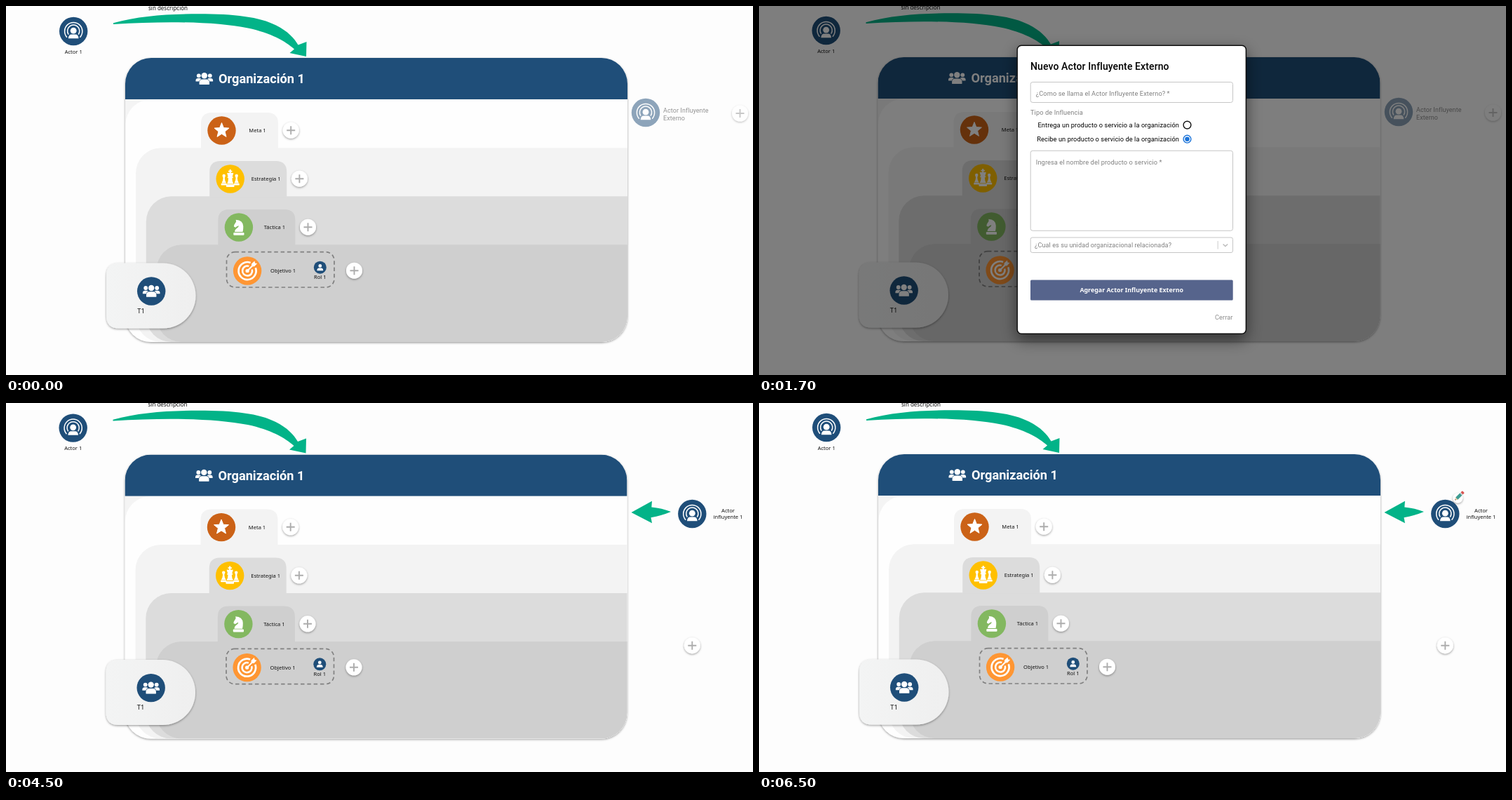
Animation of 1065 by 526 pixels, one loop 8000 ms. Source, as an HTML page:

```html
<!DOCTYPE html>
<html lang="es">
<head>
<meta charset="utf-8">
<style>
  html, body { margin: 0; width: 100%; height: 100%; overflow: hidden; background: #fdfdfd; }
  svg { display: block; width: 1065px; height: 526px; }
  text { font-family: Roboto, sans-serif; font-size: 9.25px; letter-spacing: .0094em; }
  .label { font-family: "Noto Sans", "Open Sans", sans-serif; font-size: 7.55px; letter-spacing: 0; fill: #111; }
  .mid { text-anchor: middle; }
  .end { text-anchor: end; }
  .hint { fill: #808080; }
  .small { font-size: 6.94px; fill: #707070; }
  .field { fill: #fff; stroke: #c6c6c6; }
</style>
</head>
<body>
<svg id="stage" viewBox="0 0 1065 526">
  <defs>
    <filter id="soft" x="-20%" y="-20%" width="140%" height="150%">
      <feDropShadow dx="0" dy="1.2" stdDeviation="1.6" flood-opacity=".4"/>
    </filter>
    <filter id="deep" x="-20%" y="-20%" width="140%" height="150%">
      <feDropShadow dx="0" dy="8" stdDeviation="11" flood-opacity=".5"/>
    </filter>
    <clipPath id="card"><rect x="170" y="74" width="716" height="405" rx="37"/></clipPath>
    <linearGradient id="tab" x2="1"><stop stop-color="#f3f4f4"/><stop offset="1" stop-color="#efefef"/></linearGradient>

    <g id="actor">
      <circle r="20.2" fill="#1f4e79"/>
      <g fill="none" stroke="#fff" stroke-width="1.5" stroke-linecap="round">
        <path d="M-9.6 8.2A12.6 12.6 0 1 1 9.6 8.2"/>
        <path d="M-7.3 4.2A8.6 8.6 0 1 1 7.3 4.2"/>
      </g>
      <circle cy="-.8" r="4.4" fill="#fff"/>
      <path d="M-7.3 10.2Q-7 4.6-2.8 4.6H2.8Q7 4.6 7.3 10.2Z" fill="#fff"/>
    </g>
    <g id="people" fill="#fff">
      <circle cx="-8" cy="-4" r="2.9"/><circle cx="8" cy="-4" r="2.9"/>
      <path d="M-12.3 4.2V2.5Q-12-.3-9-.3H-6.6Q-5.3-.3-4.5.6Q-7 2-7.5 4.2Z"/>
      <path d="M12.3 4.2V2.5Q12-.3 9-.3H6.6Q5.3-.3 4.5.6Q7 2 7.5 4.2Z"/>
      <circle cy="-4" r="4.2"/>
      <path d="M-7.2 8.3V5.8Q-7 1.3-2.8 1.3H2.8Q7 1.3 7.2 5.8V8.3Q7.2 8.8 6.4 8.8H-6.4Q-7.2 8.8-7.2 8.3Z"/>
    </g>
    <g id="add">
      <circle r="11.5" fill="#fff" filter="url(#soft)"/>
      <path d="M-6 0H6M0-6V6" stroke="#adadad" stroke-width="1.9"/>
    </g>
    <path id="star" fill="#fff" stroke="#fff" stroke-linejoin="round"/>
    <g id="pawn"><circle cy="-4.5" r="2.2"/><path d="M-1.6-3H1.6L1.1-1Q1.3 3 3.3 6H-3.3Q-1.3 3-1.1-1Z"/><rect x="-4" y="6.4" width="8" height="2.7" rx=".6"/></g>
    <g id="chess" fill="#fff">
      <use href="#pawn" x="-9"/><use href="#pawn" x="9"/>
      <path d="M-1-13.5H1V-11.8H2.7V-10H1V-8.4H4.6L3-3H4V-1.3H2.6Q2.8 4 4.6 7H-4.6Q-2.8 4-2.6-1.3H-4V-3H-3L-4.6-8.4H-1V-10H-2.7V-11.8H-1Z"/>
      <rect x="-5.8" y="7.8" width="11.6" height="3.8" rx=".8"/>
    </g>
    <g id="knight" fill="#fff">
      <path d="M-5.8 6.6Q-5.8 3.2-2.4 1Q0-.6-.2-2.6L-3.2-.9L-4.6.2L-7-1L-6.6-3.4L-3.8-8L-4.2-10.8Q5.8-10.6 6.4-1.5Q6.5 3 5.6 6.6Z"/>
      <rect x="-7.6" y="7.5" width="15.2" height="3.8" rx="1"/>
    </g>
    <g id="goal" fill="none" stroke="#fff">
      <path d="M4.5-11.6A12.5 12.5 0 1 0 11.7-4.3" stroke-width="2.7"/>
      <path d="M2.2-6.6A7 7 0 1 0 6.7-2" stroke-width="2.5"/>
      <circle r="2.6" fill="#fff" stroke="none"/>
      <path d="M0 0L9-9" stroke-width="2"/>
      <path d="M6-6.2V-10L10.3-14L11-11L14-10.4L10-6.2Z" fill="#fff" stroke="none"/>
    </g>
  </defs>

  <rect width="1065" height="526" fill="#fdfdfd"/>

  <g id="board">
    <use href="#actor" x="96.2" y="36"/>
    <text class="label mid" x="96.2" y="67.6">Actor 1</text>
    <text class="label" x="203" y="5.6" style="font-size:8px">sin descripción</text>
    <path fill="#02b388" d="M153 24.2C190 14 230 11.2 275 11.2C325 11.2 362 15.5 385 27.5C402 36 411 46 416.5 55.5L428.5 51L428 72L404.5 67L411 61.5C398 50 378 38.5 345 31.5C300 22.5 230 21 153 26Z"/>

    <rect x="170" y="74" width="716" height="405" rx="37" fill="#f4f4f4" filter="url(#soft)"/>
    <g clip-path="url(#card)">
      <g id="levels"></g>
      <rect x="170" y="74" width="716" height="59" fill="#1f4e79"/>
    </g>
    <use href="#people" x="282.8" y="103.3"/>
    <text x="303" y="110" fill="#fff" style="font-size:18.2px;font-weight:700;letter-spacing:0">Organización 1</text>
    <g id="rows"></g>
    <rect x="314.5" y="350.7" width="153.5" height="50.3" rx="12" fill="none" stroke="#818181" stroke-width="1.7" stroke-dasharray="5.5 3.8"/>
    <circle cx="447.8" cy="372.7" r="9" fill="#1f4e79"/>
    <circle cx="447.8" cy="370.4" r="2.4" fill="#fff"/>
    <path d="M443.4 377.2Q443.6 373.5 446 373.5H449.6Q452 373.5 452.2 377.2Z" fill="#fff"/>
    <text class="label mid" x="447.8" y="389.2">Rol 1</text>

    <path d="M161 366.5H224A46.5 46.5 0 0 1 224 459.5H161Q143 459.5 143 441.5V384.5Q143 366.5 161 366.5Z" fill="url(#tab)" filter="url(#soft)"/>
    <circle cx="207.2" cy="406.5" r="20.2" fill="#1f4e79"/>
    <use href="#people" x="207.2" y="406"/>
    <text class="label" x="187.3" y="437.6" style="font-size:9.3px">T1</text>
  </g>

  <g id="draft">
    <use href="#actor" x="912" y="152" opacity=".5"/>
    <text x="937" y="152.4" fill="#929292" style="font-size:9px">Actor Influyente</text>
    <text x="937" y="163.2" fill="#929292" style="font-size:9px">Externo</text>
    <use href="#add" x="1046.5" y="153" opacity=".65"/>
  </g>

  <g id="added">
    <path fill="#02b388" d="M891.5 156L921 139.7L920.3 148.6Q935 150 948 155Q935 160.5 919.5 163.2L921 171.2Z"/>
    <use href="#actor" x="978.3" y="158"/>
    <text class="label mid" x="1029.5" y="156.4">Actor</text>
    <text class="label mid" x="1029.5" y="165.3">influyente 1</text>
    <use href="#add" x="978.3" y="345.7"/>
  </g>

  <g id="pencil">
    <circle cx="996.3" cy="135.5" r="7" fill="#fff" filter="url(#soft)"/>
    <g transform="translate(998.3 132.6) rotate(-45)">
      <path d="M-8.5 0L-5-2.2V2.2Z" fill="#e8c9a0"/>
      <path d="M-8.5 0L-7.1-.9V.9Z" fill="#444"/>
      <rect x="-5" y="-2.2" width="8.5" height="4.4" fill="#3f9c91"/>
      <rect x="3.5" y="-2.2" width="1.7" height="4.4" fill="#c5ccd0"/>
      <rect x="5.2" y="-2.2" width="3.3" height="4.4" rx="1" fill="#d9534f"/>
    </g>
  </g>

  <g id="dialog">
    <rect width="1065" height="526" fill="#000" opacity=".5"/>
    <g id="form">
      <rect x="368.2" y="56.2" width="326.2" height="411" rx="6" fill="#fff" stroke="#111" stroke-width="1.5" filter="url(#deep)"/>
      <text x="387" y="91" style="font-size:14px;font-weight:500;letter-spacing:.0075em">Nuevo Actor Influyente Externo</text>
      <rect id="name" class="field" x="387.2" y="108.5" width="288.3" height="29" rx="3"/>
      <text class="hint" x="387" y="154.6">Tipo de Influencia</text>
      <text class="end" x="599" y="172.9">Entrega un producto o servicio a la organización</text>
      <text class="end" x="599" y="193.1">Recibe un producto o servicio de la organización</text>
      <g id="gives"></g>
      <g id="takes"></g>
      <rect class="field" x="387.2" y="206.3" width="288.3" height="114" rx="3"/>
      <rect class="field" x="387.2" y="330" width="288.3" height="21.5" rx="2.5"/>
      <path d="M654.2 335V346.5" stroke="#ccc"/>
      <path d="M661.6 339.4L664.9 342.6L668.2 339.4" fill="none" stroke="#bbb" stroke-width="1.4"/>
      <g id="empty" class="hint">
        <text x="394.8" y="128">¿Como se llama el Actor Influyente Externo? *</text>
        <text x="394.8" y="225.7">Ingresa el nombre del producto o servicio *</text>
        <text x="393" y="343.8" style="font-size:9.1px">¿Cual es su unidad organizacional relacionada?</text>
      </g>
      <g id="filled" fill="#222">
        <path d="M392.5 108.5H542M392.5 206.3H534" stroke="#fff" stroke-width="2.4"/>
        <text class="small" x="395.3" y="110.9">¿Como se llama el Actor Influyente Externo? *</text>
        <text class="small" x="395.3" y="208.6">Ingresa el nombre del producto o servicio *</text>
        <text x="396.3" y="126.2">Actor influyente 1</text>
        <text x="396.3" y="227.5">Sin desc</text>
        <path id="squiggle" fill="none" stroke="#e03030" stroke-width=".9"/>
        <text x="393.3" y="343.6">Táctica 1</text>
        <path d="M640.7 338L645.7 343M645.7 338L640.7 343" stroke="#b5b5b5" stroke-width="1.3"/>
      </g>
      <rect x="387" y="390.4" width="288.7" height="29" rx="1.5" fill="#56648c"/>
      <text class="label mid" x="531.2" y="408.4" style="font-size:8.87px;font-weight:700;fill:#fff">Agregar Actor Influyente Externo</text>
      <text class="end" x="675.6" y="446.6" fill="#8c8c8c">Cerrar</text>
    </g>
  </g>
</svg>

<script>
const $ = id => document.getElementById(id);

const points = Array.from({ length: 10 }, (_, i) => {
  const r = i % 2 ? 4.8 : 11, a = i * Math.PI / 5;
  return `${r * Math.sin(a)} ${-r * Math.cos(a)}`;
});
$('star').setAttribute('d', `M${points.join('L')}Z`);
$('squiggle').setAttribute('d', 'M412 228.8' + 'q1 -1.8 2 0t2 0'.repeat(5));

const shades = ['#fefefe', '#f3f3f3', '#dcdcdc', '#cfcfcf'];
$('levels').innerHTML = shades.map((fill, i) =>
  `<rect x="${170.4 + i * 14.7}" y="${133.3 + i * 69}" width="800" height="${345.7 - i * 69}" rx="36" fill="${fill}"/>`).join('');

const rows = [
  ['Meta 1', '#cb6217', 'star', 406.2],
  ['Estrategia 1', '#ffc000', 'chess', 418.4],
  ['Táctica 1', '#83b860', 'knight', 430.5],
  ['Objetivo 1', '#ff9633', 'goal', 496.5],
];
$('rows').innerHTML = rows.map(([name, color, icon, addX], i) => {
  const x = 307.5 + i * 12.2, y = i < 3 ? 177.5 + i * 69 : 377.5;
  const tab = i < 3
    ? `<path d="M${x - 29.5} ${y + 26}v-36q0-15.5 15.5-15.5h79q15.5 0 15.5 15.5v36z" fill="${shades[i + 1]}"/>` : '';
  return `${tab}<circle cx="${x}" cy="${y}" r="20.2" fill="${color}"/>
    <use href="#${icon}" x="${x}" y="${y}"/>
    <text class="label mid" x="${x + 51}" y="${y + 2.8}">${name}</text>
    <use href="#add" x="${addX}" y="${y - .3}"/>`;
}).join('');

function radio(id, y, on) {
  $(id).innerHTML = `<circle cx="610.5" cy="${y}" r="5.4" fill="#fff" stroke="${on ? '#1a73d9' : '#111'}" stroke-width="1.4"/>`
    + (on ? `<circle cx="610.5" cy="${y}" r="3.3" fill="#1a73d9"/>` : '');
}

const show = (id, on) => $(id).style.display = on ? '' : 'none';
const move = (id, x, y) => $(id).setAttribute('transform', `translate(${x} ${y})`);

const LOOP = 8000;
const scenes = [
  { until: 500, x: 0, y: 0 },
  { until: 2500, x: -.5, y: -1, dialog: true },
  { until: 4500, x: .5, y: 7.6, dialog: true, filled: true },
  { until: 6500, x: -.5, y: -.4, added: true },
  { until: LOOP, x: 0, y: -1, added: true, pencil: true },
];
let current;

function render(time) {
  const scene = scenes.find(s => time % LOOP < s.until);
  if (scene === current) return;
  current = scene;
  const { x, y, dialog, filled, added, pencil } = scene;
  move('board', x, y);
  move('draft', 0, y);
  move('form', filled ? .7 : 0, filled ? 8.6 : 0);
  show('draft', !added);
  show('added', added);
  show('pencil', pencil);
  show('dialog', dialog);
  show('empty', !filled);
  show('filled', filled);
  $('name').style.stroke = filled ? '#444' : '';
  radio('gives', 169.6, filled);
  radio('takes', 189.7, !filled);
}

const start = performance.now();
function tick() {
  render(performance.now() - start);
  requestAnimationFrame(tick);
}
tick();
</script>
</body>
</html>
```
